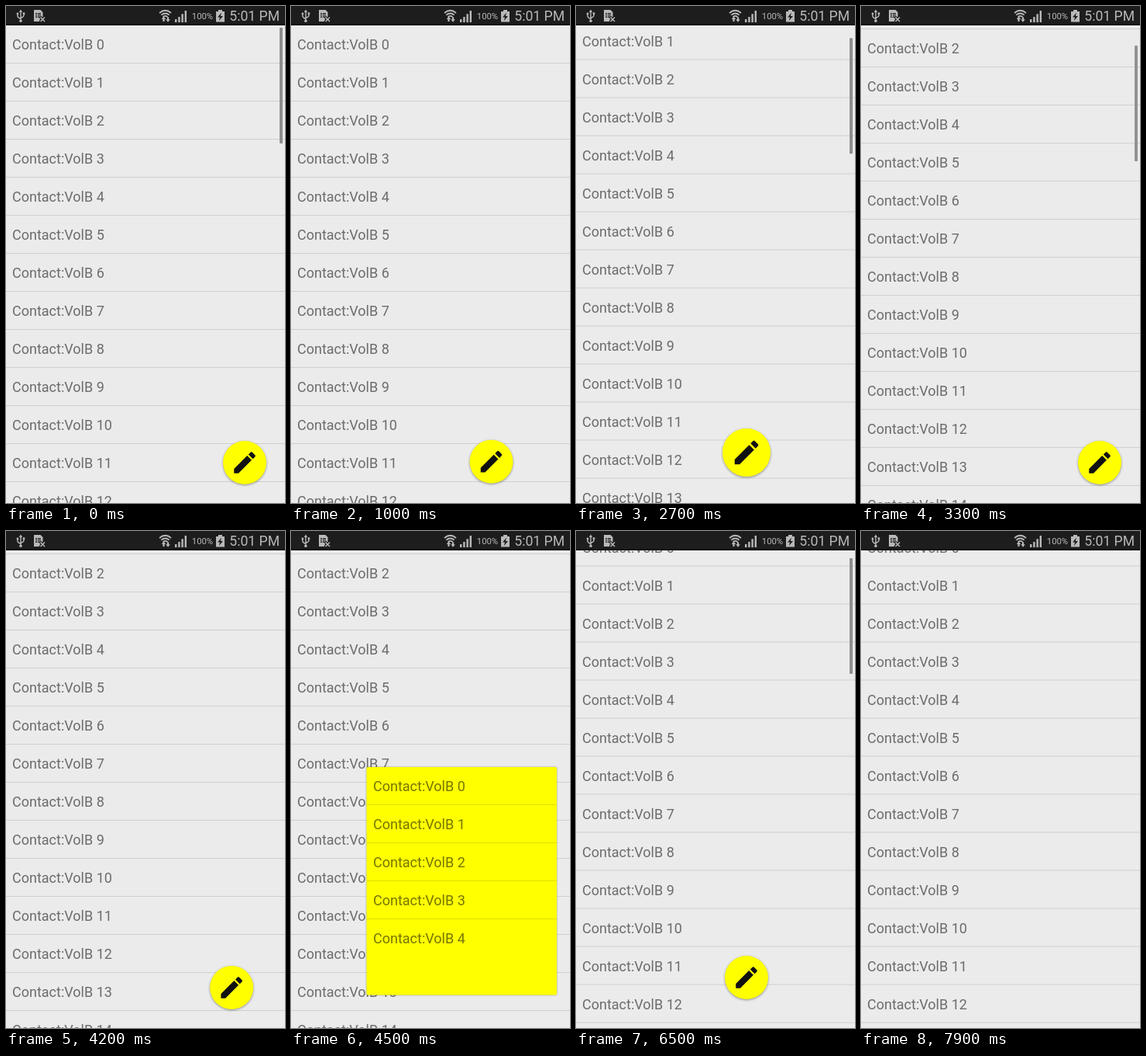
Recreate the animation shown at these times as an HTML page. Size 360 by 640 pixels, loop 8 s.

```html
<!DOCTYPE html>
<html lang="en">
<head>
<meta charset="utf-8">
<title>Contacts</title>
<style>
html, body { margin: 0; width: 100%; height: 100%; overflow: hidden; background: #ebebeb; }
svg { display: block; width: 360px; height: 640px; font-family: Roboto, sans-serif; }
.row text { font-size: 18px; fill: #000; fill-opacity: .54; }
.row rect { fill: #000; fill-opacity: .12; }
#fab { filter: drop-shadow(0 1.5px 1.5px rgba(0, 0, 0, .4)); }
#sheet { filter: drop-shadow(0 .5px 1px rgba(0, 0, 0, .35)); }
</style>
</head>
<body>
<svg viewBox="0 0 360 640">
  <defs>
    <clipPath id="reveal"><circle id="hole" cx="220.5" cy="575" r="0"/></clipPath>
    <linearGradient id="bar" x2="0" y2="1">
      <stop offset="0" stop-color="#1c1c1c"/>
      <stop offset=".85" stop-color="#1e1e1e"/>
      <stop offset="1" stop-color="#141414"/>
    </linearGradient>
  </defs>
  <rect width="360" height="640" fill="#ebebeb"/>
  <g id="list"></g>
  <rect id="thumb" x="353" width="4" height="149" rx="1" fill="#8e8e8e"/>

  <g id="sheetClip" clip-path="url(#reveal)">
    <g id="sheet">
      <rect x="97.5" y="304" width="245.5" height="293.5" rx="2" fill="#ff0"/>
      <g id="sheetRows"></g>
    </g>
  </g>

  <g id="fab">
    <circle r="28" fill="#ff0"/>
    <path transform="scale(1.53) translate(-12 -12)" fill="#111" d="M3 17.25V21h3.75L17.81 9.94l-3.75-3.75L3 17.25z
      M20.71 7.04c.39-.39.39-1.02 0-1.41l-2.34-2.34c-.39-.39-1.02-.39-1.41 0l-1.83 1.83 3.75 3.75 1.83-1.83z"/>
  </g>

  <g id="status" fill="#b9b9b9">
    <rect width="360" height="25" fill="url(#bar)"/>
    <!-- usb -->
    <g fill="none" stroke="#b9b9b9" stroke-width="1.4">
      <path d="M19 7V19M15 10.5V13Q15 15 19 16.5M23 9.5V12Q23 14 19 15.5"/>
    </g>
    <path d="M19 4.5l2.2 3.5h-4.4z"/>
    <circle cx="19" cy="19.3" r="1.8"/>
    <circle cx="15" cy="10" r="1.4"/>
    <rect x="21.7" y="8.3" width="2.6" height="2.6"/>
    <!-- memory card -->
    <path d="M36 5h8.5l3 3v6l-4 4v2H36z"/>
    <path d="M38 9h7v6h-7z" fill="#333"/>
    <path d="M38 11h7M38 13h7M40.5 9v6" stroke="#b9b9b9" stroke-width=".8"/>
    <path d="M44 14l6.5 6.5M50.5 14L44 20.5" stroke="#1e1e1e" stroke-width="3.4"/>
    <path d="M44.5 14.5l5.5 5.5M50 14.5L44.5 20" stroke="#b9b9b9" stroke-width="1.5"/>
    <!-- wi-fi -->
    <g fill="none" stroke="#b9b9b9" stroke-width="1.7">
      <path d="M198 9Q205.5 2.5 213 9M200.3 11.7Q205.5 7.3 210.7 11.7M202.5 14.2Q205.5 11.7 208.5 14.2"/>
    </g>
    <path d="M203.5 13.5l2.8 3.5h-1.7v3h-2.2v-3h-1.7zM209 20.8l-2.8-3.5h1.7v-3h2.2v3h1.7z"/>
    <!-- signal -->
    <path d="M218 17h2.4v4H218zM222.2 14h2.4v7h-2.4zM226.4 10.2h2.4V21h-2.4zM230.6 6H233v15h-2.4z"/>
    <text x="239.8" y="17" font-size="11.3">100%</text>
    <!-- battery -->
    <path d="M274 5h5v2h3v13.5h-11V7h3z"/>
    <path d="M278 8.5l-5 6h3l-1.2 4.5 5.2-6h-3.2z" fill="#1e1e1e"/>
    <text x="353" y="19" font-size="17.6" text-anchor="end">5:01 PM</text>
  </g>
</svg>
<script>
const LOOP = 8000, TICK = 100, ROW = 49;
const OPENS = [800, 4100, 7600], CLOSES = [2300, 6200];
const HOME = {x: 308, y: 588}, DOCK = {x: 220, y: 575};
const FULL_RADIUS = 320, FAB_RADIUS = 28;

// [time, value] stops
const SCROLL = [[2200, 0], [2700, 53.5], [3000, 86], [3100, 93], [6200, 93], [6300, 72], [6400, 42], [6500, 28.5]];
const THUMB = [[580, 1], [880, 0], [2200, 0], [2300, 1], [3290, 1], [3590, 0], [6200, 0], [6300, 1], [6800, 1], [7100, 0]];
const PULSE = [[300, 1], [400, 1.11], [500, 1]];

const $ = id => document.getElementById(id);
const clamp = v => Math.min(1, Math.max(0, v));
const ease = p => (1 - Math.cos(Math.PI * clamp(p))) / 2;
const mix = (a, b, p) => a + (b - a) * p;

function track(stops, t) {
  if (t <= stops[0][0]) return stops[0][1];
  for (let i = 1; i < stops.length; i++) {
    const [t0, a] = stops[i - 1], [t1, b] = stops[i];
    if (t < t1) return mix(a, b, (t - t0) / (t1 - t0));
  }
  return stops[stops.length - 1][1];
}

function rows(count, x, top, width, lines) {
  return Array.from({length: count}, (_, i) => {
    const y = top + i * ROW;
    const line = i < lines ? `<rect x="${x}" y="${y + 48}" width="${width}" height="1"/>` : '';
    return `<g class="row"><text x="${x + 8}" y="${y + 31}">Contact:VolB ${i}</text>${line}</g>`;
  }).join('');
}

// p = 0 at the resting corner, 1 under the sheet
const arc = p => ({x: mix(HOME.x, DOCK.x, p), y: mix(HOME.y, DOCK.y, p ** 4)});

function pose(t) {
  const last = list => list.filter(v => v <= t).pop() ?? -Infinity;
  const open = last(OPENS), close = last(CLOSES);
  if (open > close) {
    const dt = t - open;
    return {
      fab: dt < 300, ...arc(clamp(((dt + 40) / 320) ** 2)), scale: 1,
      radius: dt > 300 ? mix(FAB_RADIUS, FULL_RADIUS, clamp((dt - 300) / 100)) : 0
    };
  }
  const dt = t - close;
  return {
    fab: dt >= 300, ...arc(1 - ease((dt - 400) / 300)), scale: track(PULSE, dt),
    radius: dt < 300 ? mix(FULL_RADIUS, FAB_RADIUS, ease(dt / 300)) : 0
  };
}

function draw(t) {
  const scroll = track(SCROLL, t), p = pose(t);
  $('list').setAttribute('transform', `translate(0 ${-scroll})`);
  $('thumb').setAttribute('y', 28 + scroll * .247);
  $('thumb').setAttribute('opacity', track(THUMB, t));
  $('fab').setAttribute('transform', `translate(${p.x} ${p.y}) scale(${p.scale})`);
  $('fab').style.display = p.fab ? '' : 'none';
  $('sheetClip').style.display = p.radius ? '' : 'none';
  $('hole').setAttribute('r', p.radius);
}

$('list').innerHTML = rows(16, 0, 25, 360, 16);
$('sheetRows').innerHTML = rows(5, 98, 304, 245, 4);

function frame() {
  // the screen refreshes ten times a second
  draw(Math.floor(performance.now() % LOOP / TICK) * TICK);
  requestAnimationFrame(frame);
}
frame();
</script>
</body>
</html>
```
